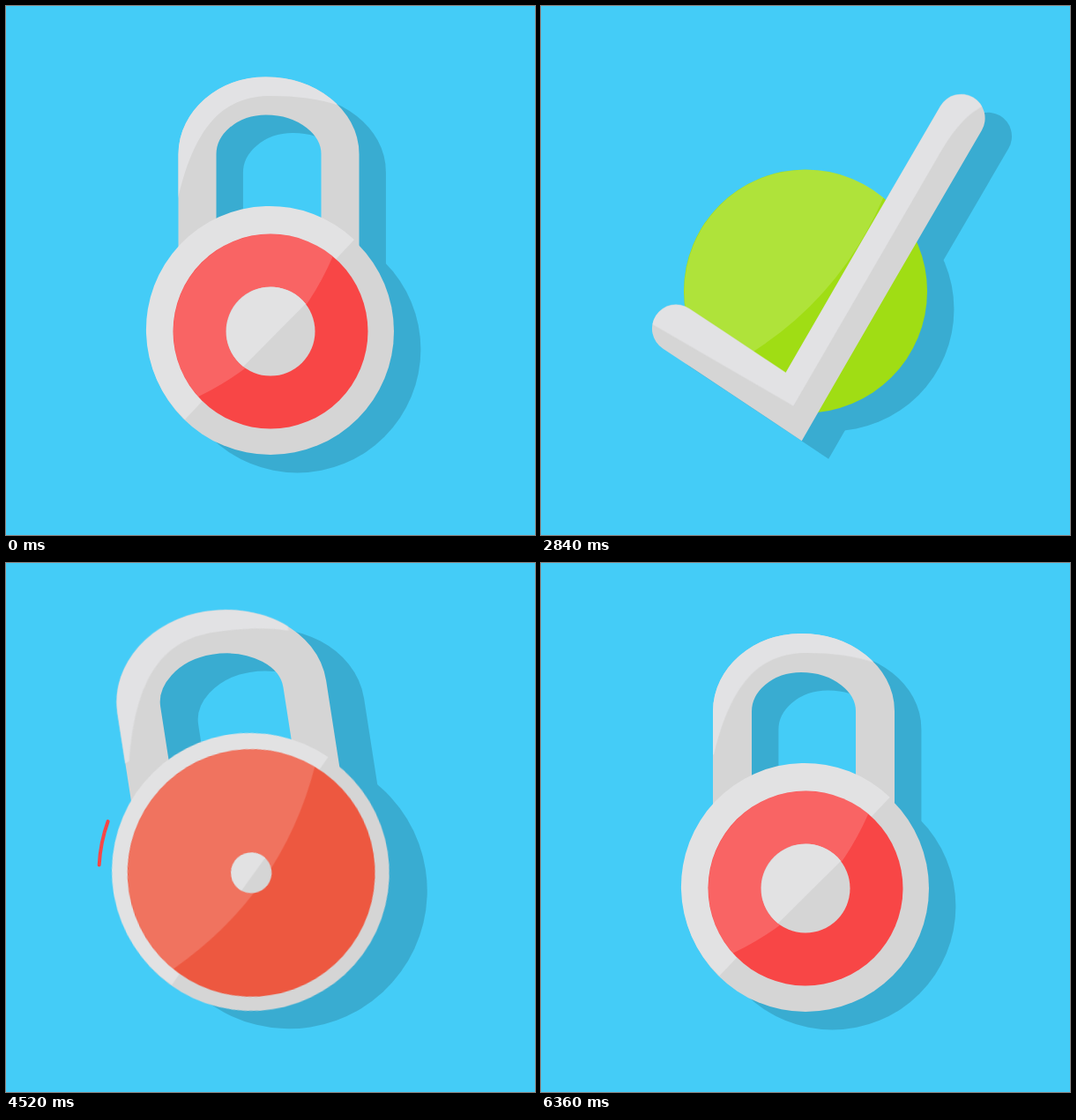
Recreate the animation shown at these times as an HTML page. Size 600 px wide and 600 px high, loop 6.4 s.

```html
<!DOCTYPE html>
<html lang="en">
<head>
<meta charset="utf-8">
<title>Padlock and check</title>
<style>
html, body { margin: 0; width: 100%; height: 100%; overflow: hidden; background: #44ccf7; }
svg { display: block; width: 100vw; height: 100vh; }
.bar, .arc { fill: none; stroke: #000; stroke-linecap: round; stroke-miterlimit: 10; }
</style>
</head>
<body>
<svg viewBox="0 0 600 600">
  <defs>
    <mask id="barMask" maskUnits="userSpaceOnUse" x="-500" y="-500" width="1000" height="1000">
      <path class="bar" style="stroke:#fff"/>
    </mask>
  </defs>
  <rect width="600" height="600" fill="#44ccf7"/>
  <g id="shadow" opacity=".15">
    <path class="arc"/>
    <g class="barBox"><path class="bar"/></g>
    <g class="ballBox"><circle r="140"/></g>
  </g>
  <path class="arc" id="swoosh"/>
  <g id="art">
    <g class="barBox" id="barArt">
      <path class="bar" style="stroke:#d5d5d5"/>
      <g mask="url(#barMask)" fill="#e2e2e4">
        <path id="lockGloss" d="M105 151C85 238 50 267 0 267Q-45 267-75 257L-80 340 160 340 160 130Z"/>
        <path id="checkGloss" d="M-176 38L-14 132 157-163Q180-202 206-214L190-290-210-40Z"/>
      </g>
    </g>
    <g class="ballBox" id="ballArt">
      <circle id="rim" r="140" fill="#d5d5d5"/>
      <g id="faces">
        <path id="rimGloss" fill="#e2e2e3" d="M95-104A140 140 0 0 0-97 100Z"/>
        <g id="disc">
          <circle r="1"/>
          <path fill="#fff" fill-opacity=".16" d="M.64-.77A1 1 0 0 0-.74.67Q.22.2.64-.77Z"/>
        </g>
        <g id="button">
          <circle r="1" fill="#d5d5d5"/>
          <path fill="#e2e2e3" d="M.79-.62A1 1 0 1 0-.61.79Z"/>
        </g>
      </g>
    </g>
  </g>
</svg>
<script>
const LOOP = 6400, SHUT = 720, REOPEN = 4190;
const RED = [248, 70, 70], GREEN = [160, 221, 20];

// Short end, its corner, the middle, the other corner, long end.
const LOCK = [[-79, 98], [-79, 267], [5, 267], [83, 267], [83, 30]];
const HOOK = [[-79, 203], [-140, 350], [-17, 372], [28, 375], [133, 206]];
const CHECK = [[-149, 43], [-81, 88], [-13.5, 133], [44, 33], [179, -199]];

const $ = id => document.getElementById(id);
const all = name => [...document.querySelectorAll('.' + name)];
const set = (els, attrs) => [].concat(els).forEach(el => {
  for (const key in attrs) el.setAttribute(key, attrs[key]);
});
const show = on => on ? 'visible' : 'hidden';
const bars = all('bar'), barBoxes = all('barBox'), ballBoxes = all('ballBox'), arcs = all('arc');

const lerp = (a, b, k) => a + (b - a) * k;
const mix = (p, q, k) => p.map((v, i) => lerp(v, q[i], k));
const polar = (r, deg) => [r * Math.cos(deg * Math.PI / 180), r * Math.sin(deg * Math.PI / 180)];

// Progress from 0 to 1 between two times, in several easings.
const ramp = (t, a, b) => Math.min(1, Math.max(0, (t - a) / (b - a)));
const ease = (t, a, b) => (1 - Math.cos(Math.PI * ramp(t, a, b))) / 2;
const out = (t, a, b, power) => 1 - (1 - ramp(t, a, b)) ** power;
const bump = (t, a, b) => Math.sin(Math.PI * ramp(t, a, b));

function barPath([p0, k1, p2, k2, p4], soft) {
  const p1 = mix(k1, p0, soft), p3 = mix(k2, p4, .28);
  return `M${p0}L${p1}C${mix(p1, k1, .55)},${mix(p2, k1, .55)},${p2}` +
    `C${mix(p2, k2, .55)},${mix(p3, k2, .55)},${p3}Q${mix(p3, p4, .75)},${p4}`;
}

function arcPath(x, y, r, from, to) {
  const [x0, y0] = polar(r, from), [x1, y1] = polar(r, to);
  return `M${x + x0} ${y + y0}A${r} ${r} 0 0 1 ${x + x1} ${y + y1}`;
}

function draw(t) {
  const back = t >= REOPEN, isLock = t < SHUT || back;
  const shrink = ease(t, 200, SHUT);
  const grow = out(t, SHUT, 1800, 2.3);
  const land = out(t, SHUT, 1480, 2);
  const away = ease(t, 2840, 3100);
  const depth = bump(t, 3550, REOPEN);
  const open = ease(t, REOPEN, 4860);
  const settle = out(t, 4860, 5500, 1.5);
  const slam = ease(t, 5080, 5480);

  // Where the ball is, how big and how far turned.
  const sway = 2 * ease(t, 3100, 3550) - away - 2 * ease(t, 3550, REOPEN) + ease(t, REOPEN, 4640);
  const x = 300 + 134 * sway;
  const y = 369 - 20 * shrink - 25.5 * land + 6 * depth + 57 * open - 11.5 * settle;
  const size = 1 - .771 * shrink + .757 * grow + .054 * away - .345 * depth + .16 * open - .2 * settle;
  const tilt = 3 * ease(t, 4860, 5080) - 18 * open + 87 * ease(t, 5080, 5600) - 72 * ease(t, 5600, 6240);
  const turn = 182 * ramp(t, 200, SHUT) ** 2 + 178 * land + tilt;
  set(ballBoxes, { transform: `translate(${x} ${y}) rotate(${turn}) scale(${size})` });

  const fall = 36.7 * (1 - .88 * shrink + .88 * land - .57 * depth + .6 * open - .6 * slam);
  set($('shadow'), { transform: `translate(${polar(fall, 34 + tilt)})` });

  // The shackle bends into a hook, then into the check mark.
  const lift = back
    ? 248 * ease(t, REOPEN, 4700) - 200 - 48 * slam
    : 29 * ease(t, 80, 200) * (1 - shrink);
  const ajar = back ? 1 - slam : 0;
  const reach = back ? 0 : out(t, SHUT, 1480, 2.5);
  const bend = bump(t, SHUT, 1800);
  const shape = LOCK.map((p, i) => {
    const [px, py] = mix(mix(p, HOOK[i], back ? 0 : shrink), CHECK[i], reach);
    return [px * (1 + .05 * ajar), py + lift];
  });
  const [first, last] = [shape[0], shape[4]];
  const barSize = back ? size : size * (1 - ease(t, 3060, 3460));
  const straight = barPath(shape, .39 + .36 * ajar);
  first[0] += 6 * bend;
  first[1] += 4 * bend;
  const tip = [last[0] - 17 * bend, last[1] + 2 * bend];
  set(bars, {
    d: bend ? barPath(shape, .39).replace(/[^,]+,[^,]+$/, tip.join()) : straight,
    'stroke-width': back ? 44 : 43 + 12 * shrink
  });
  set(barBoxes, {
    transform: `translate(${x} ${y}) rotate(${isLock ? turn + 180 : 0}) scale(${barSize})`,
    visibility: show(barSize > .001)
  });

  const lag = 5 * bump(t, 5600, 6380);
  set($('lockGloss'), {
    opacity: back ? 1 : 1 - ease(t, 250, 600),
    transform: `translate(0 ${lift}) rotate(${lag})`
  });
  set($('checkGloss'), { opacity: back ? 0 : ease(t, 950, 1350) });

  const art = $('art'), front = isLock ? $('ballArt') : $('barArt');
  if (art.lastElementChild !== front) art.appendChild(front);

  const green = ease(t, 740, 1200) - ease(t, 4250, 4600);
  set($('faces'), { transform: `rotate(${lag})` });
  set([$('rim'), $('rimGloss')], { visibility: show(isLock) });
  set($('disc'), {
    transform: `scale(${110.5 + 29.5 * (shrink - open)})`,
    fill: `rgb(${mix(RED, GREEN, green).map(Math.round)})`
  });
  set($('button'), { transform: `scale(${50.5 * (1 - shrink + ease(t, 4300, 4800))})` });

  // A thin line chases round the ball on each change.
  const turnArc = ease(t, SHUT, 1480), endArc = ease(t, 1480, 1620);
  const tail = back ? 133 * ease(t, 4300, 5110) - 200 : 137 * turnArc + 45 * endArc - 217;
  const head = back ? 133 * ease(t, 4300, 4900) - 200
    : 102 * ease(t, 560, SHUT) + 70 * turnArc + 10 * endArc - 217;
  set(arcs, {
    d: arcPath(x, y, 140 * size * (back ? 1.103 : 1.385), tail, head),
    'stroke-width': .6 + 3 * size,
    visibility: show(head - tail > .01)
  });
  $('swoosh').style.stroke = `rgb(${back ? RED : GREEN})`;
}

function tick() {
  draw(performance.now() % LOOP);
  requestAnimationFrame(tick);
}
tick();
</script>
</body>
</html>
```
